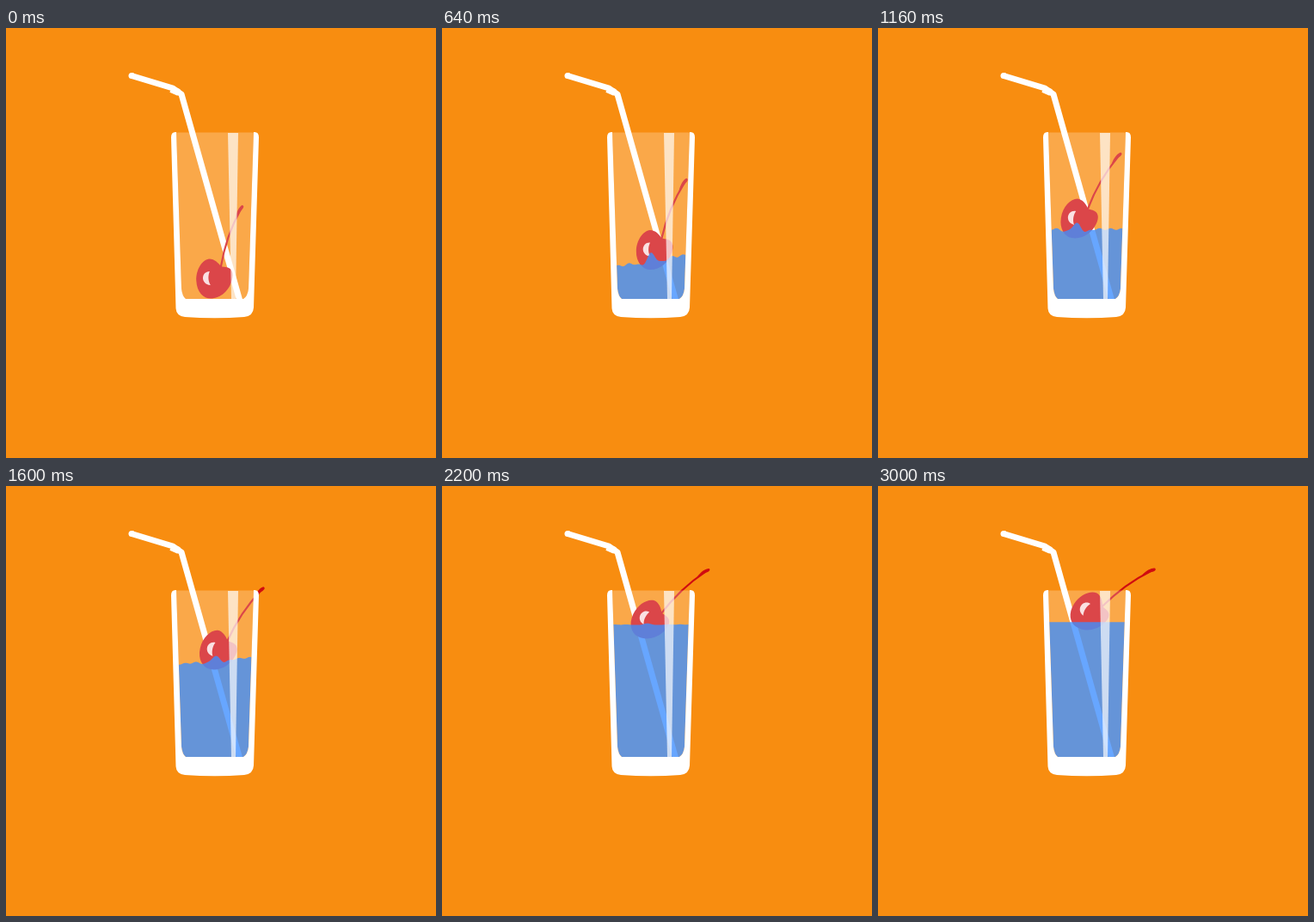
An HTML page for the animation above (3.16 s loop, 500 by 500 pixels).

```html
<!DOCTYPE html>
<html lang="en">
<head>
<meta charset="utf-8">
<title>Drink</title>
<style>
html, body { margin: 0; width: 100%; height: 100%; overflow: hidden; background: #f88d10; }
svg { display: block; width: 100%; height: 100%; }
</style>
</head>
<body>
<svg viewBox="0 0 500 500">
  <defs>
    <clipPath id="inside">
      <path d="M198 121.500 L204 303 Q205 312 209 315 H276 Q281 312 282 303 L288 121.500 Z"/>
    </clipPath>
  </defs>
  <rect width="500" height="500" fill="#f88d10"/>

  <g fill="none" stroke="#fff" stroke-width="7" stroke-linejoin="round">
    <path d="M146 55.500 L194 70 L204 77 L271.500 316"/>
    <path d="M146 55.500 h.5" stroke-linecap="round"/>
    <path d="M192 71 L201 75" stroke-width="8"/>
  </g>

  <g id="cherry" fill="#d00c10">
    <path d="M8 -13 C12 -37 20 -60 31 -80" fill="none" stroke="#d00c10" stroke-width="2.200"/>
    <path d="M25 -69 C26 -78 30 -84 33 -85 C36 -84 34 -81 31 -78 C28 -74 27 -71 25 -69 Z"/>
    <path d="M8 -14 C5 -18 0 -23 -6 -22.500 C-14 -21 -21 -10 -20.500 3 C-20 16 -12 23.500 -4 23.500
             C8 23.500 18 14 21 2 C23 -6 21 -11 16 -12.500 C13 -13.500 10 -13 8 -14 Z"/>
    <path d="M-5 -8 C-15 -8 -16 7 -4 8 C-7 3 -7 -3 -5 -8 Z" fill="#fff" fill-opacity=".84"/>
  </g>

  <g clip-path="url(#inside)">
    <path id="water" fill="rgb(2,107,255)" fill-opacity=".79"/>
    <rect x="190" y="121" width="110" height="200" fill="#fff" fill-opacity=".24"/>
    <path d="M258 122 H270 L267 315 H262 Z" fill="#fff" fill-opacity=".68"/>
  </g>

  <path fill="#fff" d="M197 121 Q192 121 192 127 L197.500 326 Q198 335 208 336 Q243 338.500 277 336
    Q287.500 335 288 325 L294 127 Q294 121 289 121 L288 121 L282 303 Q281 312 276 315
    H209 Q205 312 204 303 L198 121 Z"/>
</svg>
<script>
const LOOP = 3160, STEP = 40, LAST = 3000;
const FILL = 2240, BOTTOM = 315, TOP = 158.3, SWAY = 1160;
const cherry = document.getElementById('cherry');
const water = document.getElementById('water');

const bell = (v, width) => Math.exp(-((v / width) ** 2));
const swing = t => Math.cos(2 * Math.PI * t / SWAY);
const level = t => BOTTOM - (BOTTOM - TOP) * Math.min(1, t / FILL);

// the cherry rides the rising water, sinks a little as the pouring stops, and leans over
function cherryPose(t) {
  const lift = 12 + 12 * Math.exp(-t / 200);
  const sink = 8 * bell(t - 2330, 320);
  const drift = 13 * bell(t - SWAY, 1150) * ((1 + swing(t)) / 2) ** 2;
  const lean = 35 * (t / 2700) ** 1.5 + 2.6 * t / FILL * swing(t);
  return { x: 246.5 - drift, y: level(t) - lift + sink, tilt: Math.min(35, lean) };
}

// a hump against the cherry, a side-to-side slosh and small ripples, all calming down
function waterPath(t, cx) {
  const rough = Math.min(1, t / 400) * Math.sqrt(Math.max(0, 1 - t / FILL));
  const slosh = 4 * (1 - swing(t));
  let d = 'M190 320';
  for (let x = 190; x <= 300; x += 2) {
    const gap = x - cx + 3;
    const hump = -10 * Math.cos(gap / 4.5) * bell(gap, 14);
    const ripple = 1.5 * Math.sin(x * 0.5 - t * 0.015);
    const y = level(t) + rough * (hump + slosh * (245 - x) / 40 + ripple);
    d += ` L${x} ${y}`;
  }
  return d + ' V320 Z';
}

function draw(t) {
  const { x, y, tilt } = cherryPose(t);
  cherry.setAttribute('transform', `translate(${x} ${y}) rotate(${tilt})`);
  water.setAttribute('d', waterPath(t, x));
}

const start = performance.now();
function tick() {
  const t = (performance.now() - start) % LOOP;
  draw(Math.min(LAST, Math.floor(t / STEP) * STEP));
  requestAnimationFrame(tick);
}
draw(0);
requestAnimationFrame(tick);
</script>
</body>
</html>
```
